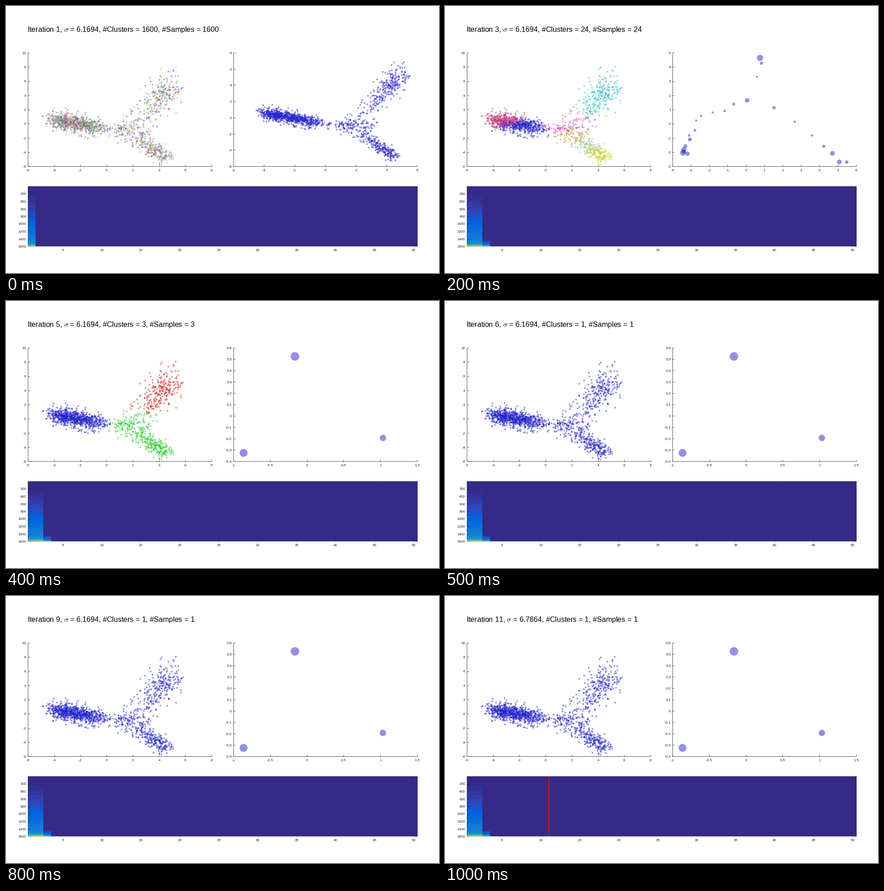
Animation, 952 px wide and 588 px high, one loop 1.1 s. Source, as a matplotlib script:

```python
import numpy as np
import matplotlib.pyplot as plt
from matplotlib.animation import FuncAnimation
from matplotlib.colors import LinearSegmentedColormap, hsv_to_rgb, to_rgb
from matplotlib.patches import Rectangle

W, H, DPI = 952, 588, 100
PX = 72 / DPI
INK = "#262626"
BLUE = "#2424cc"
DOT = 1.9
plt.rcParams.update({"font.family": "Liberation Sans", "mathtext.fontset": "cm"})

fig = plt.figure(figsize=(W / DPI, H / DPI), dpi=DPI, facecolor="white")
ax = fig.add_axes([0, 0, 1, 1])

COUNTS = [1600, 284, 24, 8, 3] + [1] * 6
LEFT = (48, 103, 452, 353)
RIGHT = (500, 103, 904, 353)
STRIP = (48, 397, 904.4, 529)

parula = LinearSegmentedColormap.from_list("parula", [
    (0, "#352a87"), (.065, "#3243ba"), (.13, "#0363e1"), (.25, "#1480d6"),
    (.38, "#079ccf"), (.5, "#15b1b4"), (.75, "#a5be6b"), (1, "#f9d62a")], N=64)


def make_cloud():
    """Three-armed cloud, returned as loose points and a tightened copy."""
    rng = np.random.default_rng(11)

    def arm(a, b, n, shape, spread):
        t = rng.beta(*shape, n)[:, None]
        noise = rng.standard_t(7, (n, 2)).clip(-3.2, 3.2) * .87
        return np.hstack([a + t * np.subtract(b, a), noise * spread])

    pts = np.vstack([
        arm((-4.2, .65), (-.2, -.75), 830, (1.5, 1.9), (.45, .58)),
        arm((2.6, 1), (5.3, 5.7), 235, (3, 2), (.55, 1.1)),
        arm((2.2, -1.8), (4.6, -4.9), 235, (1.7, 1.3), (.4, .55)),
        arm((1, -1), (3, -1), 110, (1, 1), (.45, .85)),
        arm((1.9, -.8), (3.4, 2.4), 45, (1, 1), (.6, .7)),
        arm((-.3, -.8), (1.5, -.9), 30, (1, 1), (.2, .35))])
    rng.shuffle(pts)
    skel, noise = pts[:, :2], pts[:, 2:]
    return ((skel + noise).clip((-6, -5.75), (6.8, 8.8)),
            (skel + .62 * noise).clip((-4.6, -5.3), (5.9, 6.8)))


CLOUD, TIGHT = make_cloud()
N = len(CLOUD)


def nearest(centres, jitter):
    p = CLOUD + np.random.default_rng(7).normal(0, jitter, CLOUD.shape)
    d = (p[:, None] - np.array(centres)) * (1, .75)
    return (d ** 2).sum(2).argmin(1)


def regions(jitter, **centres):
    """Colour each point like the nearest centre; keys are hex colours."""
    tones = np.array([to_rgb("#" + k[1:]) for k in centres])
    return tones[nearest(list(centres.values()), jitter)]


def patchwork():
    """Small clusters: pastel hues, with maroon ones on the two dense arms."""
    rng = np.random.default_rng(5)
    seeds = CLOUD[rng.choice(N, 284, replace=False)]
    hsv = rng.uniform((0, .1, .65), (1, .65, .9), (284, 3))
    x, y = seeds.T
    dense = (x < -1) | ((y < -2.4) & (y > -4.2))
    hsv[dense & (rng.random(284) < .5)] = (.92, .55, .42)
    hsv[y < -4.2, 0] = .165
    return hsv_to_rgb(hsv)[nearest(seeds, .1)]


COLOURS = [
    np.random.default_rng(3).uniform(.15, .95, (N, 3)),
    patchwork(),
    regions(.35, _be3c82=(-2.6, 1), _2424cc=(-2, -.6), _db3cc8=(2, .2),
            _c89628=(2.2, -1.9), _96c896=(3, -2.9), _cdcd1e=(4.2, -4.4),
            _28cdc3=(3.3, 2.7), _32b9cd=(5, 4.8)),
    regions(.3, _2424cc=(-3.5, .5), _cdc82d=(-1.3, 0), _b9b4d7=(-.4, -.6),
            _2dd237=(1.9, -.9), _282855=(3.8, -4), _32823c=(3.9, 2.7),
            _d73cd7=(4.9, 5.5)),
    regions(.1, _2424cc=(-2.6, .1), _cc2424=(4.3, 4), _24cc24=(2.7, -2.6)),
    np.tile(to_rgb(BLUE), (N, 1))]


def tripod(arms, jitter, small, big, seed):
    """Samples (x, y, radius) along bent arms, crowding towards the ends."""
    rng = np.random.default_rng(seed)
    out = []
    for n, *path in arms:
        path = np.array(path)
        s = np.append(0, np.hypot(*np.diff(path, axis=0).T).cumsum())
        t = np.sin(np.pi / 2 * np.arange(1, n + 1) / n)
        x, y = (np.interp(t, s / s[-1], c) for c in path.T)
        r = small + big * (2 * t - 1) ** 2 * rng.uniform(.2, 1, n)
        out.append(np.column_stack([x, y, r]))
    out = np.vstack(out)
    out[:, :2] += rng.normal(0, jitter, (len(out), 2))
    return out


MANY = tripod([
    (165, (.9, 2.9), (-.4, 2.1), (-2.1, 1.1), (-2.6, -.4), (-3.5, -1.8)),
    (50, (.8, 2.6), (1, 4.1), (1.4, 5.4)),
    (69, (.9, 2.8), (2.6, 1.3), (3.6, -.1), (6.2, -3))], .18, 1.6, 3, 21)
SOME = tripod([
    (14, (.5, 2.2), (-2.7, .2), (-3.4, -2.1)),
    (3, (.5, 2.2), (.9, 4.5)),
    (7, (.5, 2.2), (5.28, -2.69))], .1, 2.3, 4.6, 4)
FEW = np.array([
    (-2.02, -.63, 4.2), (-1.68, -.42, 6.5), (-1.37, -.2, 8.6), (-.35, .31, 7),
    (.42, .65, 5.8), (.86, 2.26, 7), (1.6, -.45, 6), (2.52, -1.41, 6.2)])
LAST = np.array([(-.862, -.326, 8.7), (-.163, .524, 9.4), (1.034, -.194, 7)])


def with_radius(p):
    return np.column_stack([p, np.full(len(p), DOT)])


# samples, then low, high and tick step for x and for y
STAGES = [(with_radius(TIGHT), (-6, 6, 2), (-6, 8, 2)),
          (MANY, (-4, 8, 2), (-4, 6, 1)),
          (SOME, (-4, 6, 1), (-3, 5, 1)),
          (FEW, (-3, 3, 1), (-1.5, 2.5, .5)),
          (LAST, (-1, 1.5, .5), (-.4, .6, .1))]


def spectrum():
    """Eigenvalue columns: a slow rise and a sharp peak at the bottom."""
    u = (np.arange(132) + .5) / 132
    v = np.zeros((132, 50))
    for col, (start, peak) in enumerate([(0, 46), (.01, 42), (.88, 150)]):
        w = ((u - start) / (1 - start)).clip(0)
        v[:, col] = .3 * w ** 1.6 + .7 * np.exp((u - 1) * peak)
    v[-1, 3] = .12
    return v


HEAT = spectrum()


def line(x, y, colour=INK, lw=.8, **kw):
    ax.plot(x, y, color=colour, lw=lw * PX, solid_capstyle="butt", **kw)


def label(x, y, s, ha, size=8, colour=INK):
    ax.text(x, y, s, ha=ha, va="baseline", fontsize=size * PX, color=colour)


def ticks(lo, hi, step, a, b):
    """Tick positions between pixels a and b, with their texts."""
    for v in lo + step * np.arange(round((hi - lo) / step) + 1):
        yield a + (v - lo) / (hi - lo) * (b - a), f"{round(v, 2) + 0:g}"


def plot(box, xs, ys, samples, colours):
    x0, y0, x1, y1 = box
    px = np.interp(samples[:, 0], xs[:2], (x0, x1))
    py = np.interp(samples[:, 1], ys[:2], (y1, y0))
    dots = ax.scatter(px, py, s=(2 * samples[:, 2] * PX) ** 2, c=colours,
                      alpha=.5, linewidths=0, zorder=1)
    dots.set_clip_path(Rectangle((x0 - 5, y0 - 5), x1 - x0 + 10, y1 - y0 + 5,
                                 transform=ax.transData))
    line([x0, x0, x1], [y0, y1, y1])
    for x, s in ticks(*xs, x0, x1):
        line([x, x], [y1, y1 - 4])
        label(x, y1 + 10.5, s, "center")
    for y, s in ticks(*ys, y1, y0):
        line([x0, x0 + 4], [y, y])
        label(x0 - 3.5, y + 3, s, "right")


def strip(i):
    x0, y0, x1, y1 = STRIP
    v = HEAT.copy()
    v[:, i + 1:] = 0
    ax.imshow(parula(v), extent=(x0, x1, y1, y0), interpolation="nearest",
              aspect="auto", zorder=1)
    line([x0, x1, x1, x0, x0], [y0, y0, y1, y1, y0], alpha=.5)
    cell = (x1 - x0) / 50
    for k in range(5, 51, 5):
        x = x0 + (k - .5) * cell
        line([x, x], [y0, y0 + 8.5], alpha=.5)
        line([x, x], [y1, y1 - 8.5], alpha=.5)
        label(x, y1 + 10.5, str(k), "center")
    for k in range(200, 1601, 200):
        y = y0 + k / 1600 * (y1 - y0)
        line([x0, x0 + 8.5], [y, y], alpha=.5)
        line([x1, x1 - 8.5], [y, y], alpha=.5)
        label(x0 - 3.5, y + 3, str(k), "right")
    if i == 10:
        x = x0 + (i + .5) * cell
        line([x, x], [y0, y1], "#c0142f", 2)


def draw(i):
    ax.cla()
    ax.axis("off")
    sigma = 6.7864 if i == 10 else 6.1694
    n = COUNTS[i]
    label(47.3, 57.5, rf"Iteration {i + 1}, $\sigma$ = {sigma}, "
          f"#Clusters = {n}, #Samples = {n}", "left", 16, "black")
    plot(LEFT, (-6, 8, 2), (-6, 10, 2), with_radius(CLOUD), COLOURS[min(i, 5)])
    samples, xs, ys = STAGES[min(i, 4)]
    plot(RIGHT, xs, ys, samples, BLUE)
    strip(i)
    ax.set_xlim(0, W)
    ax.set_ylim(H, 0)
    return []


anim = FuncAnimation(fig, draw, frames=11, init_func=lambda: [], interval=100,
                     repeat=True, repeat_delay=0, blit=False)
plt.show()
```
